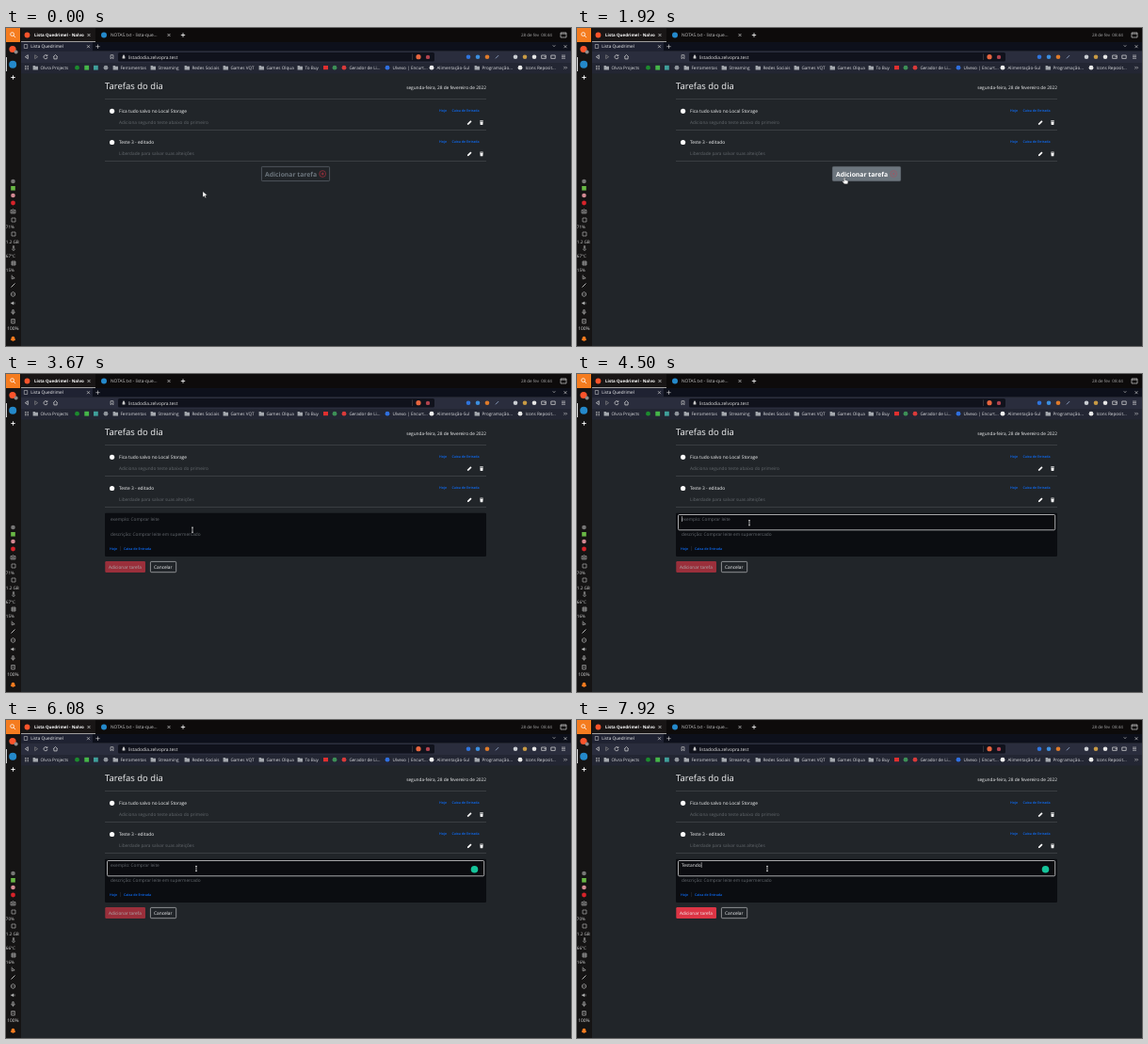
An HTML page for the animation above (8 s loop, 600x338 px).

```html
<!DOCTYPE html>
<html lang="pt-BR">
<head>
<meta charset="utf-8">
<title>Tarefas do dia</title>
<style>
html, body { margin: 0; width: 100%; height: 100%; overflow: hidden; background: #212529; }
svg { display: block; width: 100vw; height: 100vh; }
text { font-family: "Open Sans", "Noto Sans", sans-serif; text-rendering: geometricPrecision; white-space: pre; }
</style>
</head>
<body>
<svg id="stage" viewBox="0 0 600 338"></svg>
<script>
const LOOP = 8000, OPEN = 2960, FOCUS = 4250, TYPE = 6750, KEY = 130;
const WORD = "Testando";
const GREY = "#a4a8ae", BLUE = "#0d6efd", RED = "#dc3545", ORANGE = "#f57c1f", RULE = "#464a4e";

const text = (x, y, s, size = 4.75, fill = "#f4f5f6", more = "") =>
  `<text x="${x}" y="${y}" font-size="${size}" fill="${fill}" ${more}>${s}</text>`;
const rect = (x, y, w, h, fill, more = "") =>
  `<rect x="${x}" y="${y}" width="${w}" height="${h}" fill="${fill}" ${more}/>`;
const dot = (x, y, r, fill, more = "") =>
  `<circle cx="${x}" cy="${y}" r="${r}" fill="${fill}" ${more}/>`;
const stroke = (x, y, d, color = GREY, w = .7) =>
  `<path transform="translate(${x} ${y})" d="${d}" fill="none" stroke="${color}" stroke-width="${w}"/>`;
const shape = (x, y, d, fill = GREY) =>
  `<path transform="translate(${x} ${y})" d="${d}" fill="${fill}"/>`;

const CROSS = "M-1.5-1.5l3 3m0-3l-3 3", PLUS = "M-2.2 0h4.4M0-2.2v4.4";
const FOLDER = "M-2.7-2.3h2l.7.8h2.7v3.8h-5.4z";
const PENCIL = "M-2.4 2.4l.5-1.7L1.1-2.3l1.2 1.2L-.7 1.9z";
const TRASH = "M-1.9-2h1.2l.3-.4h.8l.3.4h1.2v.7h-3.8zM-1.6-.9h3.2L1.3 2.4h-2.6z";
const BOX = "M-2-2h4v4h-4z", GRID = "M-2-1.6h4M-2 0h4M-2 1.6h4";

function desktop() {
  let s = rect(0, 0, 600, 15, "#0d0b0b") + rect(0, 15, 16, 323, "#151414") +
    rect(16, 0, 79, 15, "#191616") + rect(16, 14.3, 79, .7, "#d8d8d8") + rect(0, 0, 15, 15, ORANGE);
  s += stroke(7.3, 7.3, "M.8.8L2.8 2.8M1.2-.7a1.9 1.9 0 1 1-3.8 0a1.9 1.9 0 1 1 3.8 0", "#fff", .8);
  s += dot(22.5, 7.5, 2.9, "#fb542b") +
    text(30, 9.3, "Lista Quedrimel - Nalvo", 4.5, "#fff", 'font-weight="bold"') +
    stroke(88, 7.5, CROSS, "#ddd") + dot(104, 7.5, 3, "#2489ca") +
    text(111, 9.3, "NOTAS.txt - lista-que...", 4.8, "#c9c9c9") +
    stroke(173, 7.5, CROSS, "#ccc") + stroke(188, 7.5, PLUS, "#eee", .9) +
    text(547, 9.3, "28 de fev  08:44", 4.5, "#aaa") +
    stroke(592, 7.5, "M-3-2.5h6v5h-6zM-3-1.4h6", "#cfcfcf");

  s += rect(0, 31, .9, 15, "#e8e8e8") + dot(7, 22.5, 3.6, "#fb542b") + dot(10.6, 25.4, 2, "#8b8b8b") +
    dot(7.2, 38.7, 4, "#2489ca") + stroke(7.5, 52.5, PLUS, "#fff", .9) +
    dot(7.5, 163, 2.3, "#777") + rect(5.2, 168, 4.6, 4.6, "#69b845") + dot(7.5, 178, 2.3, "#d48a94") +
    dot(7.5, 186, 2.4, "#d8232a") + stroke(7.5, 195, "M-2.4-1.5h1.2l.5-.6h1.4l.5.6h1.2v3.4h-4.8zM-.9.2a.9.9 0 1 0 1.8 0a.9.9 0 1 0-1.8 0", "#bbb") +
    stroke(8, 204, BOX, "#aaa") + stroke(8, 219, BOX, "#aaa") +
    stroke(8, 234, "M-.6-2.3h1.2v2.5a1.2 1.2 0 1 1-1.2 0z", "#aaa") +
    stroke(8, 250, BOX + "M-2 0h4M-2-1h4M-2 1h4", "#aaa") +
    stroke(7.5, 265, "M-1.3-2.4v4.2l3-1-2.2-1.5", "#bbb") +
    stroke(7.5, 273.5, "M-2 2L2-2", "#ccc", .9) +
    stroke(7.5, 283, "M0-2.4L2-1.2v2.4L0 2.4-2 1.2v-2.4zM-.6 0h1.2", "#bbb") +
    shape(7.5, 292.5, "M-2.2-.8h1.3L.6-2v4L-.9.8h-1.3zM1.2-1h.6v2h-.6z", "#bbb") +
    stroke(7.5, 302, "M-.7-2.3h1.4v2.6h-1.4zM-1.8-.3a1.8 1.8 0 0 0 3.6 0M0 1.4v1.2", "#bbb") +
    stroke(7.5, 311.5, "M-1.8-2h3.6v4.3h-3.6zM-.8 0h1.6", "#bbb") +
    shape(7.5, 330.3, "M-2.7 1.6c1-.9.4-4.2 2.7-4.2s1.7 3.3 2.7 4.2zM-1 2h2v.8h-2z", ORANGE) +
    text(1.2, 321.3, "100%", 4.9, "#ddd");
  [["cpu", 213.3], ["ram", 228.6], ["heat", 243.6], ["load", 258.9]].forEach(([id, y]) =>
    s += text(-.2, y, "", 4.6, "#d0d0d0", `id="${id}"`));
  return s;
}

function browser() {
  let s = rect(16, 15, 584, 9.5, "#0d101b") + rect(16, 15, 76, 9.5, "#1f2232") +
    rect(16, 24.5, 584, 12.5, "#2a2d3d") + rect(16, 37, 584, 11.5, "#232633") +
    rect(119, 26, 336, 9.6, "#10121c", 'rx="1.5"');
  s += stroke(21, 19.5, "M-1.7-2h3.4v4h-3.4z", "#ddd", .5) +
    text(26.2, 21.4, "Lista Quedrimel", 4.7) + stroke(87.5, 19.7, CROSS, "#ddd", .6) +
    stroke(97.5, 19.7, PLUS, "#ddd", .6) +
    stroke(582, 19, "M-1.2-.6L0 .6 1.2-.6", "#ddd") + stroke(594, 19.7, CROSS, "#ddd", .6) +
    stroke(22, 30.7, "M1.3-2L-1.6 0l2.9 2z", "#ddd") + stroke(32, 30.7, "M-1.3-2L1.6 0l-2.9 2z", "#888") +
    stroke(42, 30.7, "M1.6-1.2A2 2 0 1 0 2 .3M1.9-2.4v1.4H.5", "#ddd") +
    stroke(52.5, 30.7, "M-2.3 0L0-2.2 2.3 0M-1.6-.4v2.6h3.2v-2.6", "#ddd") +
    stroke(112.5, 30.7, "M-1.4-2h2.8v4L0 .8-1.4 2z", "#ccc") +
    shape(125, 30.7, "M-1.4-.4h.5v-.8a.9.9 0 0 1 1.8 0v.8h.5v2.2h-2.8z", "#ccc") +
    text(129.8, 32.5, "listadodia.zelvopra.test", 4.9, "#e8e8e8") +
    rect(431, 27.5, .4, 6.5, "#666") + dot(438, 30.7, 2.6, "#e8663f") + dot(448, 30.9, 2.2, "#b0434f");
  const extras = [[491, "#2f74dd"], [501, "#3c8fe0"], [511, "#e07b2a"], [541, "#c9cdd2"], [551, "#c99b45"], [561, "#e6e6e6"]];
  extras.forEach(([x, c]) => s += dot(x, 30.7, 2.3, c));
  s += stroke(521.5, 30.7, "M-1.6 1.6L1.6-1.6", "#8fa3c4", .9) +
    stroke(571, 30.7, "M-2.3-1.7h4.6v3.4h-4.6zM.4 0h1.9", "#ddd") + stroke(581, 30.7, "M-2.2-1.7h4.4v3.4h-4.4z", "#ddd") +
    stroke(592, 30.7, GRID, "#ddd", .6);

  const folders = [[31, "Olvra Projects"], [116, "Ferramentas"], [156, "Streaming"], [192, "Redes Sociais"],
    [233, "Games VQT"], [271, "Games Olqua"], [312, "To Buy"], [500, "Programação..."]];
  folders.forEach(([x, name]) => s += shape(x + .3, 42.2, FOLDER) + text(x + 5.4, 44, name, 4.65, "#dcdde0"));
  const links = [[359, "#d93a3a", "Gerador de Li..."], [405, "#2f6fe0", "Ulvexo | Encurt..."],
    [452, "#f0f0f0", "Alimentação-Sul"], [546, "#e8e8e8", "Icons Reposit..."]];
  links.forEach(([x, c, name]) => s += dot(x, 42.2, 2.4, c) + text(x + 5.4, 44, name, 4.65, "#dcdde0"));
  s += `<g stroke-dasharray=".9 .6">${stroke(22, 42.2, GRID, "#ccc", .9)}</g>` +
    dot(75.5, 42.2, 2.4, "#1c8a2e") + rect(83.3, 39.8, 4.8, 4.8, "#45b649") + rect(93, 39.8, 4.8, 4.8, "#3f9f9a") +
    dot(106, 42.2, 2.4, "#8f949b") + rect(337, 40, 5, 4.2, "#e02f2f") + dot(349, 42.2, 2.4, "#3d8f57") +
    stroke(594, 42.2, "M-1.6-1.3l1.2 1.3-1.2 1.3M.4-1.3L1.6 0 .4 1.3", "#ddd", .6);
  return s;
}

const tags = (x1, x2, y) => [[x1, "Hoje"], [x2, "Caixa de Entrada"]]
  .map(([x, name]) => text(x, y, name, 3.6, BLUE, 'font-weight="600"')).join("");

function task(y, title, note) {
  return dot(112.6, y, 2.6, "#fff") + text(120, y + 1.9, title, 4.85) + text(120, y + 13.6, note, 4.75, "#62676c") +
    tags(460, 473.5, y + .2) + shape(492.2, y + 12.3, PENCIL, "#fff") + shape(505, y + 12.3, TRASH, "#fff") +
    rect(105, y + 19.7, 405, .7, RULE);
}

function page() {
  return rect(16, 48.5, 584, 290, "#212529") + text(105, 65.2, "Tarefas do dia", 9.5) +
    text(510, 64.7, "segunda-feira, 28 de fevereiro de 2022", 4.75, "#f4f5f6", 'text-anchor="end"') +
    rect(105, 75.2, 405, .7, RULE) +
    task(88.3, "Fica tudo salvo no Local Storage", "Adiciona segundo teste abaixo do primeiro") +
    task(121.5, "Teste 3 - editado", "Liberdade para salvar suas alteições") +
    `<g id="opener">` +
      rect(270.4, 146.4, 74.2, 17.2, "none", 'id="ring" rx="1.8" stroke="#6c757d" stroke-width="1.3" opacity=".55"') +
      rect(271.4, 147.4, 72.2, 15.2, "#6c757d", 'id="fill" rx="1"') +
      rect(271.4, 147.4, 72.2, 15.2, "none", 'rx="1" stroke="#6c757d" stroke-width=".6"') +
      text(275, 157.6, "Adicionar tarefa", 6.8, "", 'id="label" font-weight="bold"') +
      `<g id="plus">` + dot(336.2, 155, 3.4, "none", `stroke="${RED}" stroke-width=".5"`) +
      stroke(336.2, 155, "M-1.5 0h3M0-1.5v3", RED, .6) + `</g></g>` +
    `<g id="form">` + rect(105, 147.7, 405, 46.3, "#0b0d11", 'rx="1.2"') +
      rect(107.5, 149.5, 400.2, 16.3, "#0b0c10", 'id="field" rx="1.2" stroke="#fff" stroke-width=".65"') +
      text(111, 156, "exemplo: Comprar leite", 4.75, "#64696e", 'id="hint"') +
      text(111, 156, "", 4.85, "#f4f5f6", 'id="typed"') + rect(111, 151.2, .5, 5.8, "#fff", 'id="caret"') +
      dot(497.5, 158.8, 3.8, "#15c39a", 'id="helper"') +
      text(111, 172, "descrição: Comprar leite em supermercado", 4.75, "#64696e") +
      tags(110, 125, 186.6) + rect(121.5, 183, .4, 5, "#3a3d42") +
      `<g id="submit">` + rect(105.3, 199, 42.7, 12, RED, 'rx="1.2"') + text(109, 206.8, "Adicionar tarefa", 4.7) + `</g>` +
      rect(153.4, 199.4, 27.3, 11.3, "none", 'rx="1.2" stroke="#f8f9fa" stroke-width=".5"') +
      text(157, 206.8, "Cancelar", 4.8) + `</g>`;
}

const pointers = `<g id="pointer">
  <path id="arrow" d="M0 0L4.6 4 2.6 4.3 3.6 6.4 2.6 6.8 1.6 4.8 0 6z" fill="#fff" stroke="#111" stroke-width=".3"/>
  <path id="hand" d="M-.2 0q.8-.4.9.6v2.1l2.6.6q.8.3.6 1.2l-.5 2.4h-3.5L-2.2 4.4q-.2-1 .8-.7l.8.6V.6q0-.5.4-.6z" fill="#fff" stroke="#111" stroke-width=".3"/>
  <path id="beam" d="M-1-2.6H1M0-2.6V2.6M-1 2.6H1" fill="none" stroke="#fff" stroke-width=".65"/></g>`;

const stage = document.getElementById("stage");
stage.innerHTML = page() + browser() + desktop() + pointers;
const el = {};
stage.querySelectorAll("[id]").forEach(node => el[node.id] = node);

const clamp = v => Math.max(0, Math.min(1, v));
const show = (node, on) => node.setAttribute("visibility", on ? "inherit" : "hidden");
const write = (node, s) => { if (node.textContent !== s) node.textContent = s; };

// time, x, y
const path = [[80, 209, 173.8], [1130, 283.2, 159.4], [1400, 284, 159], [OPEN, 284, 158.8], [3560, 198, 165.7],
  [3750, 198, 165.7], [4100, 183, 158.2], [4650, 183, 158.2], [5400, 202, 158], [LOOP, 202, 158]];

function pointerAt(t) {
  const i = path.findIndex(p => p[0] > t);
  if (i === 0) return path[0].slice(1);
  const [a, b] = [path[i - 1], path[i]];
  const k = (t - a[0]) / (b[0] - a[0]), e = k * k * (3 - 2 * k);
  return [a[1] + (b[1] - a[1]) * e, a[2] + (b[2] - a[2]) * e];
}

function draw(t) {
  const hover = clamp((t - 1130) / 150), open = t >= OPEN, focus = t >= FOCUS;
  show(el.opener, !open);
  show(el.form, open);
  show(el.ring, !open && t >= 2700);
  el.fill.setAttribute("opacity", hover);
  const mix = [108, 117, 125].map(c => Math.round(c + (255 - c) * hover * hover));
  el.label.setAttribute("fill", `rgb(${mix})`);
  el.plus.setAttribute("opacity", 1 - .4 * hover);

  const count = t < TYPE ? 0 : Math.min(WORD.length, 1 + Math.floor((t - TYPE) / KEY));
  write(el.typed, WORD.slice(0, count));
  show(el.field, focus);
  show(el.hint, !count);
  show(el.helper, t >= 5000);
  show(el.caret, focus && (count > 0 || (t - FOCUS) % 1000 < 500));
  el.caret.setAttribute("x", 111.2 + (count ? el.typed.getComputedTextLength() : 0));
  el.submit.setAttribute("opacity", .65 + .35 * clamp((t - TYPE) / 150));

  const later = t >= 4330;
  write(el.cpu, later ? "70%" : "71%");
  write(el.ram, "1.2 GB");
  write(el.heat, later ? "66°C" : "67°C");
  write(el.load, later ? "16%" : "15%");

  const [x, y] = pointerAt(t);
  el.pointer.setAttribute("transform", `translate(${x} ${y})`);
  show(el.arrow, t < 1100);
  show(el.hand, t >= 1100 && !open);
  show(el.beam, open);
}

function tick() {
  draw(performance.now() % LOOP);
  requestAnimationFrame(tick);
}
tick();
</script>
</body>
</html>
```
